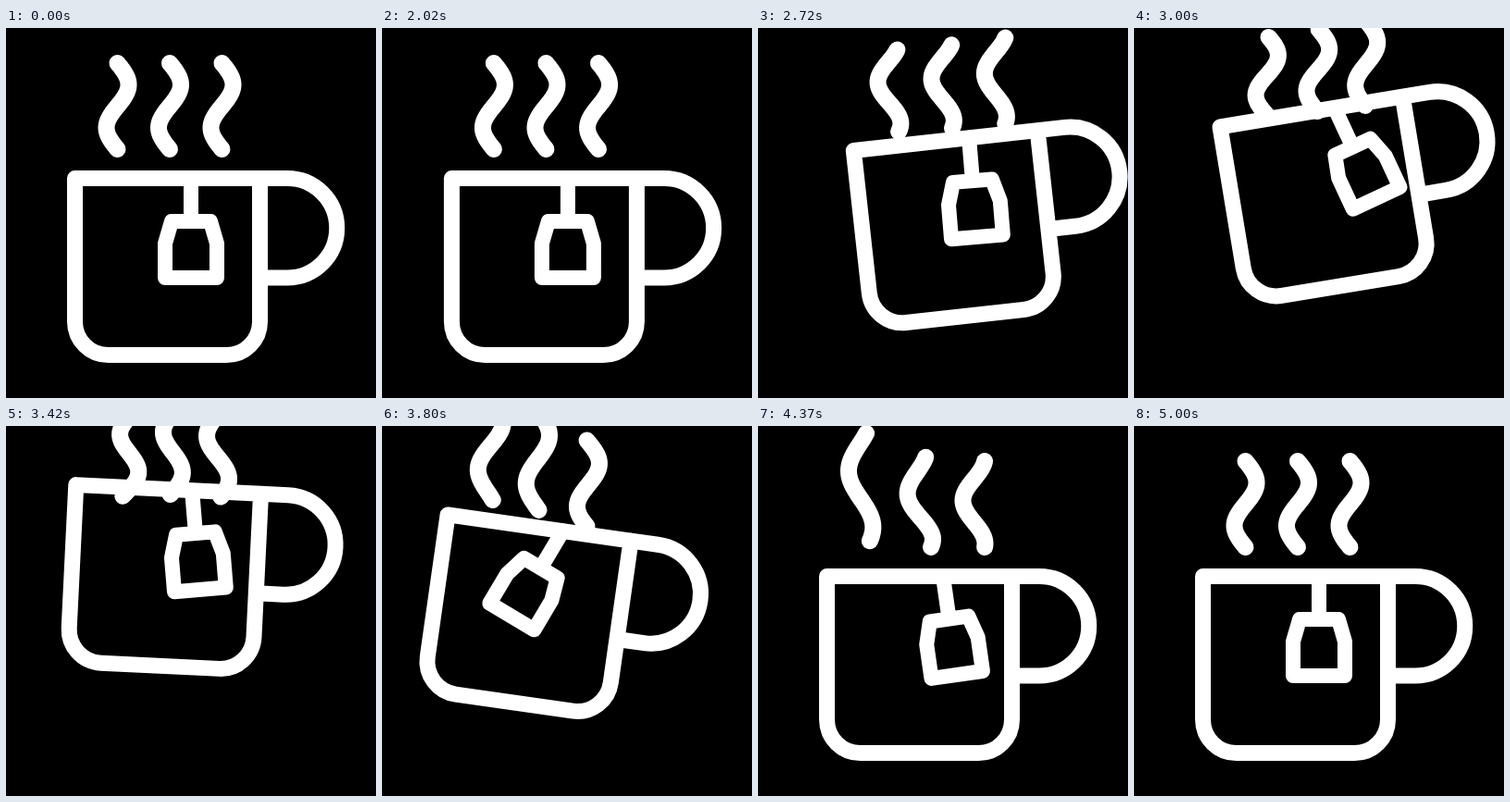
Recreate the animation shown at these times as an HTML page with a canvas. Size 400 by 400 pixels, loop 5200 ms.

```html
<!DOCTYPE html>
<html lang="en">
<head>
<meta charset="utf-8">
<title>Cup of tea</title>
<style>
  html, body { margin: 0; width: 100%; height: 100%; overflow: hidden; background: #000; }
  canvas { display: block; }
</style>
</head>
<body>
<canvas id="stage" width="400" height="400"></canvas>
<script>
const ctx = document.getElementById('stage').getContext('2d');
const { PI, sin } = Math;
const RAD = PI / 180;
const LOOP = 5200, START = 2000, ACTIVE = 3000;
const CUP_TIME = 2240;

const clamp01 = v => Math.min(1, Math.max(0, v));

// One trip around a lopsided loop: out to the right, up, back on the left.
function trip(time, duration) {
  const s = clamp01(time / duration);
  const w = s ** (1.2 + 0.3 * s);
  const sway = sin(2 * PI * w);
  const rise = sin(PI * w) ** 2;
  return { x: sway * (sway > 0 ? 39 : 18), y: -95 * rise, tilt: -14.5 * sway * rise };
}

// Swings twice, strongest a little after the middle.
function bagSwing(time) {
  const s = clamp01(time / ACTIVE);
  return 24 * sin(PI * s ** 1.2) * sin(4 * PI * s);
}

// Speeds up, runs evenly, slows down; goes from 0 to 1.
function cruise(time, speedUp = 360, slowDown = 700) {
  const t = clamp01(time / ACTIVE) * ACTIVE;
  const total = ACTIVE - (speedUp + slowDown) / 2;
  if (t < speedUp) return t * t / (2 * speedUp) / total;
  if (t > ACTIVE - slowDown) return 1 - (ACTIVE - t) ** 2 / (2 * slowDown) / total;
  return (t - speedUp / 2) / total;
}

function rotateAt(x, y, degrees) {
  ctx.translate(x, y);
  ctx.rotate(degrees * RAD);
  ctx.translate(-x, -y);
}

function stroke(path, width) {
  ctx.lineWidth = width;
  ctx.stroke(path);
}

const cup = new Path2D(`M74.5 162.5H274.5V317.5A36 36 0 0 1 238.5 353.5H110.5A36 36 0 0 1 74.5 317.5Z
  M274.5 162.5H304A53.75 53.75 0 0 1 304 270H274.5`);
const bag = new Path2D('M200 162.5V209M179 209H221L228 233V270H172V233Z');

function drawCup(time) {
  const { x, y, tilt } = trip(time, CUP_TIME);
  ctx.save();
  ctx.translate(x, y);
  rotateAt(175, 258, tilt);
  stroke(cup, 17);
  rotateAt(200, 162.5, bagSwing(time));
  stroke(bag, 16);
  ctx.restore();
}

// Waves run down each strand while it trails the cup, the left one and the tops last.
function drawSteam(time) {
  const drift = 20 * RAD * sin(PI * clamp01(time / ACTIVE) ** 2);
  for (let i = 0; i < 3; i++) {
    const lag = 2 - i;
    const phase = (1 - i) * drift - 6 * PI * cruise(time);
    const path = new Path2D();
    for (let u = 0; u <= 1.001; u += 0.02) {
      const { x, y } = trip(time, 2130 + lag * (220 + 175 * (1 - u)));
      const wave = 12 * sin(phase + 2 * PI * u);
      path.lineTo(120.5 + 56.5 * i + 0.6 * x + wave, 38 + 93 * u + 0.6 * y);
    }
    stroke(path, 18);
  }
}

ctx.strokeStyle = '#fff';
ctx.lineCap = ctx.lineJoin = 'round';
const begin = performance.now();

function frame() {
  const time = (performance.now() - begin) % LOOP - START;
  ctx.clearRect(0, 0, 400, 400);
  drawCup(time);
  drawSteam(time);
  requestAnimationFrame(frame);
}
frame();
</script>
</body>
</html>
```
